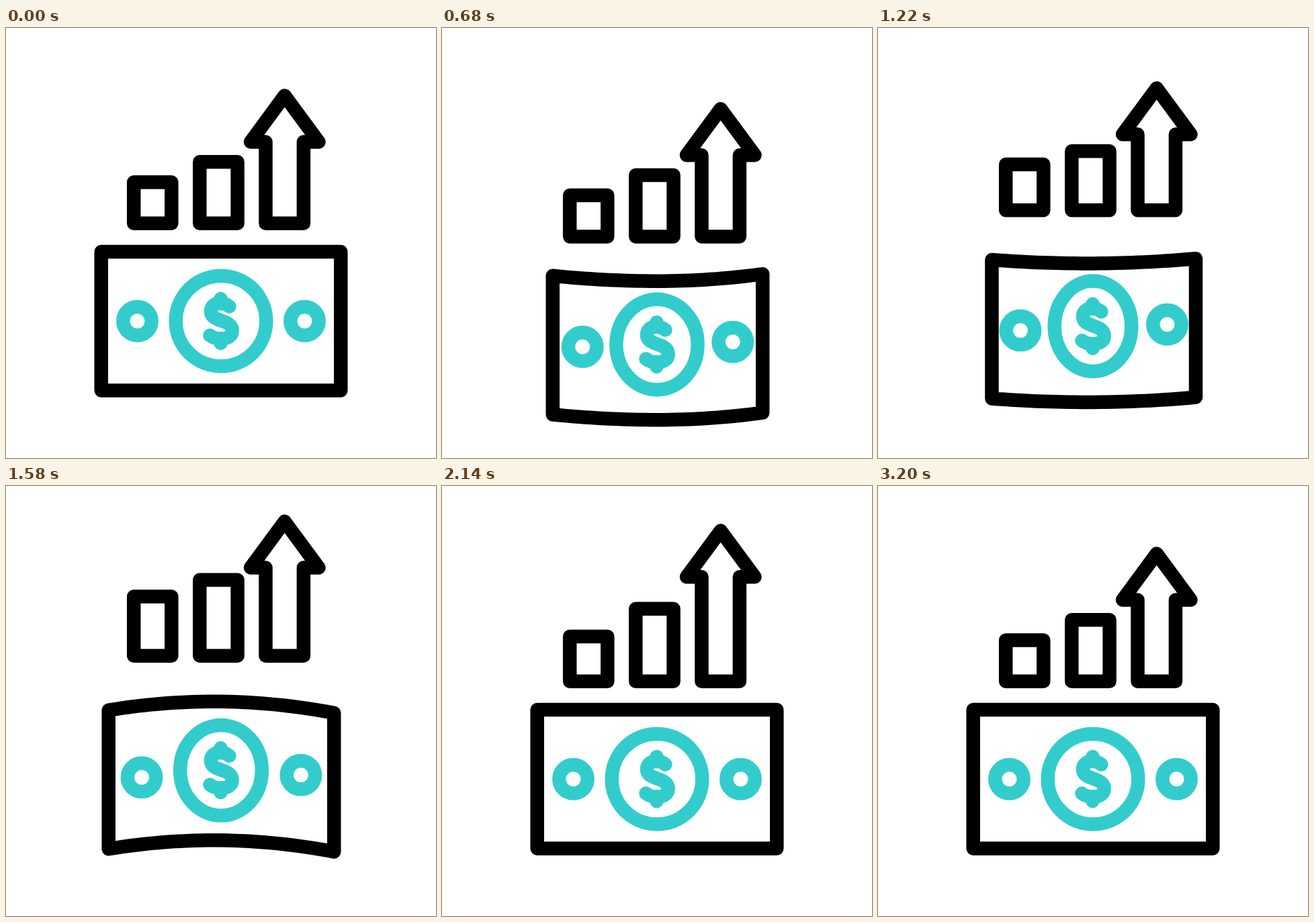
An HTML page for the animation above (3600 ms loop, 640 by 640 pixels).

```html
<!DOCTYPE html>
<html lang="en">
<head>
<meta charset="utf-8">
<title>Growing money</title>
<style>
  html, body { margin: 0; width: 100%; height: 100%; overflow: hidden; background: #fff; }
  svg { display: block; width: 100%; height: 100%; }
  svg * { fill: none; stroke-width: 20.5; stroke-linejoin: round; stroke-linecap: round; }
  .ink { stroke: #000; }
  .teal { stroke: #33cccd; }
</style>
</head>
<body>
<svg viewBox="0 0 640 640">
  <g class="teal">
    <ellipse id="ring" cx="320" ry="67.3"/>
    <circle id="left" r="21.2"/>
    <circle id="right" r="21.2"/>
    <path id="dollar" d="M332.5 414.5C328 411 324 409.5 319.5 409.5C311 409.5 305 414 305 421.5C305 430 312 432.5 320 435.5C330 438.7 336.7 442.5 336.7 450.5C336.7 459 329 462.5 319.5 462.5C312 462.5 308 461 303.5 457.5M319.5 403V410M319.5 462V469"/>
  </g>
  <g class="ink">
    <path id="bill"/>
    <path id="small"/>
    <path id="medium"/>
    <path id="arrow"/>
  </g>
</svg>
<script>
const LOOP = 3600;
const START = 190, CROUCH = 720, FOLD = 920, PEAK = 1600, LAND = 1960, SETTLE = 2600, REST = 3200;

const set = (id, attrs) => {
  for (const name in attrs) document.getElementById(id).setAttribute(name, attrs[name]);
};

function ease(t, from, to) {
  const p = Math.min(1, Math.max(0, (t - from) / (to - from)));
  return p * p * (3 - 2 * p);
}

// Sum of eased moves, each given as [from, to, distance].
const travel = (t, ...moves) =>
  moves.reduce((sum, [from, to, distance]) => sum + distance * ease(t, from, to), 0);

const baseShift = t => travel(t, [START, CROUCH, 20], [760, 1500, -58], [PEAK, 2060, 38]);

// Each bar squashes, stretches and springs back; later bars lag behind.
function topShift(t, order) {
  const squash = 9, rebound = 10, stretch = 27 + 4 * order;
  const rise = FOLD + 115 * order, fall = 1570 + 265 * order;
  return baseShift(t) + travel(t,
    [CROUCH, FOLD, squash],
    [rise, fall, -squash - stretch],
    [fall, SETTLE, stretch + rebound],
    [SETTLE, REST, -rebound]);
}

function drawBars(t) {
  const bottom = 290.7 + baseShift(t);
  const bar = (x1, x2, top) => ({ d: `M${x1} ${bottom}V${top}H${x2}V${bottom}Z` });
  set("small", bar(190.2, 246.3, 229.4 + topShift(t, 0)));
  set("medium", bar(288.3, 344.6, 199.2 + topShift(t, 1)));

  const tip = 100.7 + topShift(t, 2), neck = tip + 68.8;
  set("arrow", { d: `M386.5 ${bottom}V${neck}H364L414.7 ${tip}L465.5 ${neck}H442.9V${bottom}Z` });
}

function drawBill(t) {
  const fold = travel(t, [300, FOLD, 1], [FOLD, 1980, -1]);
  const drop = travel(t, [START, CROUCH, 35], [680, 1000, -23], [1100, 1800, -12]);
  const bow = travel(t, [500, 900, 21.5], [FOLD, PEAK, -36.5], [PEAK, LAND, 15]);
  const wave = travel(t, [START, 440, 5.5], [460, CROUCH, -5.5]);
  const center = 320 + 1.5 * fold, halfWidth = 178.3 - 33 * fold;

  const steps = 32;
  const edge = (y, direction) => Array.from({ length: steps + 1 }, (_, i) => {
    const v = direction * (2 * i / steps - 1);
    const bend = bow * (1 - v * v - 0.14 * v) + wave * Math.sin(Math.PI * v);
    return `${(center + halfWidth * v).toFixed(2)} ${(y + drop + bend).toFixed(2)}`;
  });
  set("bill", { d: `M${[...edge(333, 1), ...edge(539.5, -1)].join("L")}Z` });

  const middle = 436.2;
  const ringShift = travel(t, [START, CROUCH, 35.5], [760, PEAK, -48.5], [PEAK, LAND, 13]);
  set("ring", { cy: middle + ringShift, rx: 67.3 + travel(t, [300, FOLD, -10], [1300, 2000, 10]) });
  set("dollar", { transform: `translate(0 ${ringShift})` });

  const spread = 124.5 - 19 * fold, lean = 5.5 * fold;
  const sideY = middle + drop + 0.45 * (ringShift - drop);
  set("left", { cx: center - spread, cy: sideY + lean });
  set("right", { cx: center + spread, cy: sideY - lean });
}

function frame() {
  const t = performance.now() % LOOP;
  drawBars(t);
  drawBill(t);
  requestAnimationFrame(frame);
}
frame();
</script>
</body>
</html>
```
